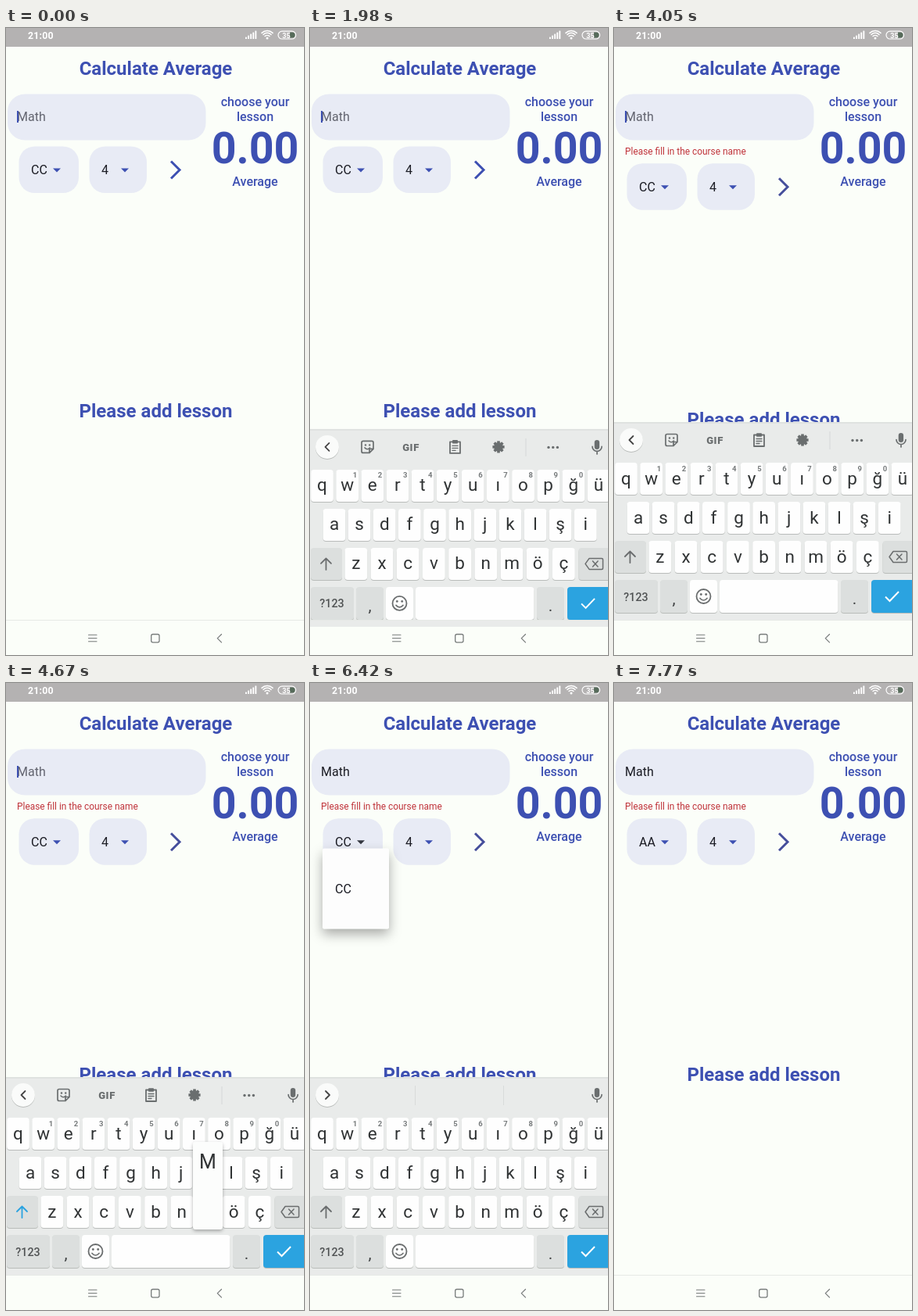
Recreate the animation shown at these times as an HTML page. Size 381 px wide and 802 px high, loop 8000 ms.

```html
<!DOCTYPE html>
<html lang="en">
<head>
<meta charset="utf-8">
<title>Calculate Average</title>
<style>
html, body { margin: 0; width: 100%; height: 100%; overflow: hidden; background: #fbfef9; }
svg { display: block; width: 100vw; height: 100vh; font-family: Roboto, sans-serif; }
.mid { text-anchor: middle; }
.line { fill: none; stroke-linecap: round; stroke-linejoin: round; }
.key { filter: drop-shadow(0 1px 0.4px #b9bcba); }
</style>
</head>
<body>
<svg id="stage" viewBox="0 0 381 802"></svg>
<script>
const LOOP = 8000, KB_TOP = 505, KB_H = 252, ITEM = 46, MENU_TOP = 48, PAD = 8;
const BLUE = '#3d50b2', INK = '#1b1c24', GREY = '#5c6061', FIELD = '#e8ebf5', PAGE = '#fbfef9';
const GRADES = ['AA', 'BA', 'BB', 'CB', 'CC', 'DC', 'DD', 'FD', 'FF'];
const PICKED = 4;
const MENU_H = GRADES.length * ITEM + 2 * PAD;

const rect = (x, y, w, h, r, fill, extra = '') =>
  `<rect x="${x}" y="${y}" width="${w}" height="${h}" rx="${r}" fill="${fill}" ${extra}/>`;
const text = (s, x, y, size, fill, extra = '') =>
  `<text x="${x}" y="${y}" font-size="${size}" fill="${fill}" ${extra}>${s}</text>`;
const mid = (s, x, y, size, fill, weight = 400, extra = '') =>
  text(s, x, y, size, fill, `class="mid" font-weight="${weight}" ${extra}`);
const line = (d, stroke, w, extra = '') =>
  `<path class="line" d="${d}" stroke="${stroke}" stroke-width="${w}" ${extra}/>`;
const dot = (x, y, r, fill) => `<circle cx="${x}" cy="${y}" r="${r}" fill="${fill}"/>`;

function statusBar() {
  let s = rect(0, 0, 381, 24, 0, '#b4b2b2') +
    text('21:00', 28, 13.6, 12.3, '#fff', 'font-weight="700" letter-spacing=".2"');
  for (let i = 0; i < 5; i++) s += rect(306 + i * 3.1, 11.5 - i * 2, 1.9, 2.5 + i * 2, 0.5, '#fff');
  for (const r of [4.2, 7.2, 10])
    s += line(`M${334 - r * .7} ${13.6 - r * .72}A${r} ${r} 0 0 1 ${334 + r * .7} ${13.6 - r * .72}`, '#fff', 1.5);
  s += dot(334, 13, 1.5, '#fff');
  s += rect(348, 4.2, 22.5, 9.8, 4.9, '#b4b2b2', 'stroke="#fff" stroke-width="1.2"');
  s += '<path d="M363 5.6h3a3.5 3.5 0 0 1 0 7h-3z" fill="#566b5a"/>';
  return s + mid('35', 358.5, 12.5, 9, '#fff', 700);
}

const triangle = (x, id) => `<path id="${id}" d="M${x - 5} 179.5h10l-5 5z" fill="${BLUE}"/>`;

function page() {
  return rect(0, 0, 381, 802, 0, PAGE) +
    mid('Calculate Average', 191.5, 60, 24, BLUE, 700) +
    rect(2, 84.5, 253.5, 59, 22, FIELD) +
    text('', 14, 118.5, 16, INK, 'id="field"') +
    rect(14, 120, 28, 1.1, 0, INK, 'id="under"') +
    rect(14, 106, 2, 15, 0, BLUE, 'id="caret"') +
    text('Please fill in the course name', 14, 162, 11.9, '#c0343b', 'id="error"') +
    '<g id="row">' +
    rect(16.5, 151.5, 76.5, 59.5, 20, FIELD) + rect(106.5, 151.5, 73.5, 59.5, 20, FIELD) +
    text('CC', 32, 187, 16, INK, 'id="grade"') + triangle(65, 'tri') +
    text('4', 122, 187, 16, INK) + triangle(152, 'tri2') +
    `<path id="go" d="M211 170.5l11 11-11 11" fill="none" stroke="${BLUE}" stroke-width="3"/></g>` +
    mid('choose your', 318.5, 99.5, 16, BLUE, 500) + mid('lesson', 318.5, 118.5, 16, BLUE, 500) +
    mid('0.00', 318.5, 173, 55.5, BLUE, 700) + mid('Average', 318.5, 201.5, 16, BLUE, 500) +
    mid('Please add lesson', 191.5, 498, 24, BLUE, 700, 'id="please"');
}

function menu() {
  const items = GRADES.map((g, i) =>
    text(g, 32, MENU_TOP + PAD + ITEM * (i + .5) + 6, 16, INK, 'class="item"')).join('');
  return `<clipPath id="cut">${rect(16, 0, 85, 0, 2, '#fff', 'class="pane"')}</clipPath><g id="menu">` +
    rect(16, 0, 85, 0, 2, '#fdfdfd', 'class="pane" filter="url(#deep)"') +
    `<g clip-path="url(#cut)">${items}</g></g>`;
}

// Keyboard parts use coordinates local to its top edge.
const spots = {};
function letters(chars, x0, step, y, shade) {
  return [...chars].map((c, i) => {
    const x = x0 + i * step;
    spots[c] = [x, y];
    return rect(x - 14.4, y, 28.8, 41, 4, shade, 'class="key"') +
      mid(c, x, y + 27.5, 22.5, '#303334', 400, `class="mid letter" data-c="${c}"`);
  }).join('');
}

function toolbar() {
  const g = '#6a6e6f', teeth = [];
  for (let i = 0; i < 8; i++) teeth.push(`<path d="M241 22v-7.6" stroke="${g}" stroke-width="3.6" transform="rotate(${i * 45} 241 22)"/>`);
  return '<g id="tools">' + line('M24.5 17l-5 5 5 5', '#444', 1.8) +
    line('M68 14.5h11a2 2 0 0 1 2 2v8l-5 5h-8a2 2 0 0 1-2-2v-11a2 2 0 0 1 2-2zM81 24.5h-5v5', g, 1.7) +
    dot(71, 19.5, 1.2, g) + dot(76.2, 19.5, 1.2, g) + line('M70 23q3.5 3.5 6.5 0', g, 1.5) +
    mid('GIF', 129, 26.7, 13, g, 900, 'letter-spacing=".6"') +
    line('M179 15.5h13v14.5h-13z', g, 1.8) + rect(182, 13.2, 7, 4.5, 1, g) +
    line('M182 20.5h7M182 23.5h7M182 26.5h4', g, 1.3) +
    teeth.join('') + `<circle cx="241" cy="22" r="4.2" fill="none" stroke="${g}" stroke-width="3.4"/>` +
    rect(275.5, 11, 1, 23, 0, '#d5d8d7') +
    [305, 310.7, 316.4].map(x => dot(x, 22.5, 1.7, g)).join('') + '</g>' +
    '<g id="hints">' + line('M20 17l5 5-5 5', '#444', 1.8) +
    rect(134, 10, 1, 25, 0, '#d8dbda') + rect(247, 10, 1, 25, 0, '#d8dbda') +
    [84, 191, 298].map(x => mid('', x, 29, 17.8, '#3a3d3e', 400, 'class="mid word"')).join('') + '</g>' +
    rect(363.7, 13, 6.4, 12, 3.2, g) + line('M361 21.5a6 6 0 0 0 12 0M367 28v3', g, 1.7);
}

function keyboard() {
  const dark = '#dcdfde', white = '#fefefe', ink = '#6a6d6e';
  const digits = [...'1234567890'].map((d, i) => mid(d, 57.5 + i * 32.1, 61.5, 9.5, '#777b7c', 700)).join('');
  return `<g id="board">` +
    rect(0, 0, 381, KB_H, 0, '#e9ebea') + rect(0, -1, 381, 2, 0, '#dfe2e0') +
    `<circle cx="22" cy="22" r="15" fill="#fafbfa" class="key"/>` + toolbar() +
    letters('qwertyuıopğü', 15.5, 32.13, 51, white) + digits +
    letters('asdfghjklşi', 31, 32.13, 101, white) +
    letters('zxcvbnmöç', 58.8, 33.2, 151, white) +
    rect(1, 151, 40, 41, 4, dark, 'class="key"') +
    line('M20.5 179v-14M14 171l6.5-6.5 6.5 6.5', ink, 1.8, 'id="shift"') +
    rect(343.5, 151, 42, 41, 4, dark, 'class="key"') +
    line('M357 164.5h16a1.5 1.5 0 0 1 1.5 1.5v11a1.5 1.5 0 0 1-1.5 1.5h-16l-5-7zM361.5 168l6.5 7M368 168l-6.5 7', ink, 1.5) +
    rect(1, 201, 55, 42, 4, dark, 'class="key"') + mid('?123', 28, 227.5, 14.3, '#505354', 500) +
    rect(59, 201, 35, 42, 4, dark, 'class="key"') + mid(',', 76.5, 232, 21, '#404344') +
    rect(97, 201, 35, 42, 4, white, 'class="key"') +
    `<circle cx="114.5" cy="222" r="9" fill="none" stroke="${ink}" stroke-width="1.8"/>` +
    dot(111.3, 219.5, 1.4, ink) + dot(117.7, 219.5, 1.4, ink) + line('M110 224.5q4.5 5 9 0', ink, 1.7) +
    rect(135, 201, 151.5, 42, 4, white, 'class="key"') +
    rect(290, 201, 35, 42, 4, dark, 'class="key"') + mid('.', 307.5, 232, 21, '#404344') +
    rect(329, 201, 56, 42, 4, '#2ba3e0', 'class="key"') +
    line('M347 222.5l5.5 5.5 11.5-12', '#fff', 2, 'style="stroke-linecap:butt;stroke-linejoin:miter"') +
    '<g id="pop">' + rect(-19, -69, 38, 112, 4, '#fcfdfc', 'filter="url(#soft)"') +
    mid('', 0, -35, 25, '#303334', 400, 'id="popChar"') + '</g></g>';
}

function navBar() {
  const c = '#777b7b';
  return rect(0, 757, 381, 1, 0, '#e6e9e6') +
    line('M105.5 776.2h10.5M105.5 780.5h10.5M105.5 784.8h10.5', c, 1.1) +
    rect(185.7, 775.5, 10.3, 10.3, 2, 'none', `stroke="${c}" stroke-width="1.3"`) +
    line('M275.5 775.5l-5.2 5.2 5.2 5.2', c, 1.2);
}

const stage = document.getElementById('stage');
stage.innerHTML = `<defs>
  <filter id="deep" x="-60%" y="-30%" width="220%" height="170%"><feDropShadow dx="0" dy="7" stdDeviation="7.5" flood-opacity=".33"/></filter>
  <filter id="soft" x="-30%" y="-20%" width="160%" height="140%"><feDropShadow dx="0" dy="2" stdDeviation="2.2" flood-opacity=".3"/></filter>
  </defs>` + page() + menu() + keyboard() + navBar() + statusBar();

const $ = id => document.getElementById(id);
const all = sel => [...stage.querySelectorAll(sel)];
const set = (el, attrs) => { for (const k in attrs) el.setAttribute(k, attrs[k]); };
const show = (el, on) => el.setAttribute('visibility', on ? 'visible' : 'hidden');
const put = (el, s) => { if (el.textContent !== s) el.textContent = s; };
const within = (t, a, b) => t >= a && t < b;
const ramp = (t, a, b) => Math.min(1, Math.max(0, (t - a) / (b - a)));
const panes = all('.pane'), items = all('.item'), caps = all('.letter'), words = all('.word');

// Standard curve, cubic-bezier(.4, 0, .2, 1)
function ease(x) {
  let lo = 0, hi = 1;
  for (let i = 0; i < 24; i++) {
    const s = (lo + hi) / 2, r = 1 - s;
    if (1.2 * s * r * r + .6 * s * s * r + s ** 3 < x) lo = s; else hi = s;
  }
  return 3 * lo * lo * (1 - lo) + lo ** 3;
}

const TYPED = [
  [4680, 'M', ['M', 'Merhaba', 'Ma']],
  [4880, 'Ma', ['Ma', 'Mat', 'Max']],
  [5080, 'Mat', ['Mat', 'Matematik', 'May']],
  [5220, 'Math', ['Math', 'Marjinal', 'Matthew']]
];
const TAPS = [['m', 4600, 4740], ['a', 4800, 4930], ['t', 5000, 5120], ['h', 5150, 5260]];
const CARET_ON = [[0, 440], [940, 1440], [1940, 2470], [2960, 3510], [4050, 5760], [6230, 6335]];

function drawField(t) {
  const step = TYPED.filter(s => t >= s[0]).pop();
  put($('field'), step ? step[1] : 'Math');
  set($('field'), { fill: step ? INK : '#62646f' });
  const w = step ? $('field').getComputedTextLength() : 0;
  set($('under'), { width: w });
  show($('under'), step && t < 6335);
  set($('caret'), step ? { x: 14 + w, y: 104, height: 18.5 } : { x: 14, y: 106, height: 15 });
  show($('caret'), CARET_ON.some(([a, b]) => within(t, a, b)));

  const failed = t >= 2470, fade = ramp(t, 2470, 2640);
  set($('error'), { opacity: fade, y: 162 - 3 * (1 - fade) });
  set($('row'), { transform: `translate(0 ${failed ? 21.7 : 0})` });
  set($('please'), { y: failed ? 509 : 498 });
  set($('go'), { stroke: failed ? '#464f9c' : BLUE });
  put($('grade'), t >= 7440 ? 'AA' : 'CC');
  set($('tri'), { fill: within(t, 6335, 7440) ? '#33363f' : BLUE });
  return step;
}

function drawMenu(t) {
  const v = ramp(t, 6335, 6635), grow = ramp(v, .25, .5);
  const alpha = ramp(v, 0, .25) * (1 - ramp(t, 7425, 7560));
  show($('menu'), alpha > 0);
  set($('menu'), { opacity: alpha });
  const top0 = MENU_TOP + PAD + PICKED * ITEM;
  const top = top0 + (MENU_TOP - top0) * grow;
  const end = top0 + ITEM + (MENU_TOP + MENU_H - top0 - ITEM) * grow;
  panes.forEach(p => set(p, { y: top, height: end - top }));
  const unit = .5 / (GRADES.length + 1.5);
  items.forEach((el, i) => {
    const from = .5 + (i + 1) * unit;
    set(el, { opacity: i === PICKED ? 1 : ramp(v, from, from + 1.5 * unit) });
  });
}

function drawKeyboard(t, step) {
  const up = ease(ramp(t, 1717, 2062)) - ease(ramp(t, 6470, 6780));
  show($('board'), up > 0);
  set($('board'), { transform: `translate(0 ${KB_TOP + KB_H * (1 - up)})` });
  $('board').style.display = up > 0 ? '' : 'none';

  const upper = within(t, 4400, 4740);
  caps.forEach(el => put(el, upper ? el.dataset.c.toLocaleUpperCase('tr') : el.dataset.c));
  set($('shift'), { stroke: upper ? '#2ba3e0' : '#6a6d6e' });
  $('tools').style.display = step ? 'none' : '';
  $('hints').style.display = step ? '' : 'none';
  if (step) words.forEach((el, i) => put(el, step[2][i]));

  const tap = TAPS.find(k => within(t, k[1], k[2]));
  $('pop').style.display = tap ? '' : 'none';
  if (tap) {
    const [x, y] = spots[tap[0]];
    put($('popChar'), upper ? tap[0].toUpperCase() : tap[0]);
    set($('pop'), { transform: `translate(${x} ${y})` });
  }
}

function draw(t) {
  const step = drawField(t);
  drawMenu(t);
  drawKeyboard(t, step);
}

function tick() {
  draw(performance.now() % LOOP);
  requestAnimationFrame(tick);
}
tick();
</script>
</body>
</html>
```
